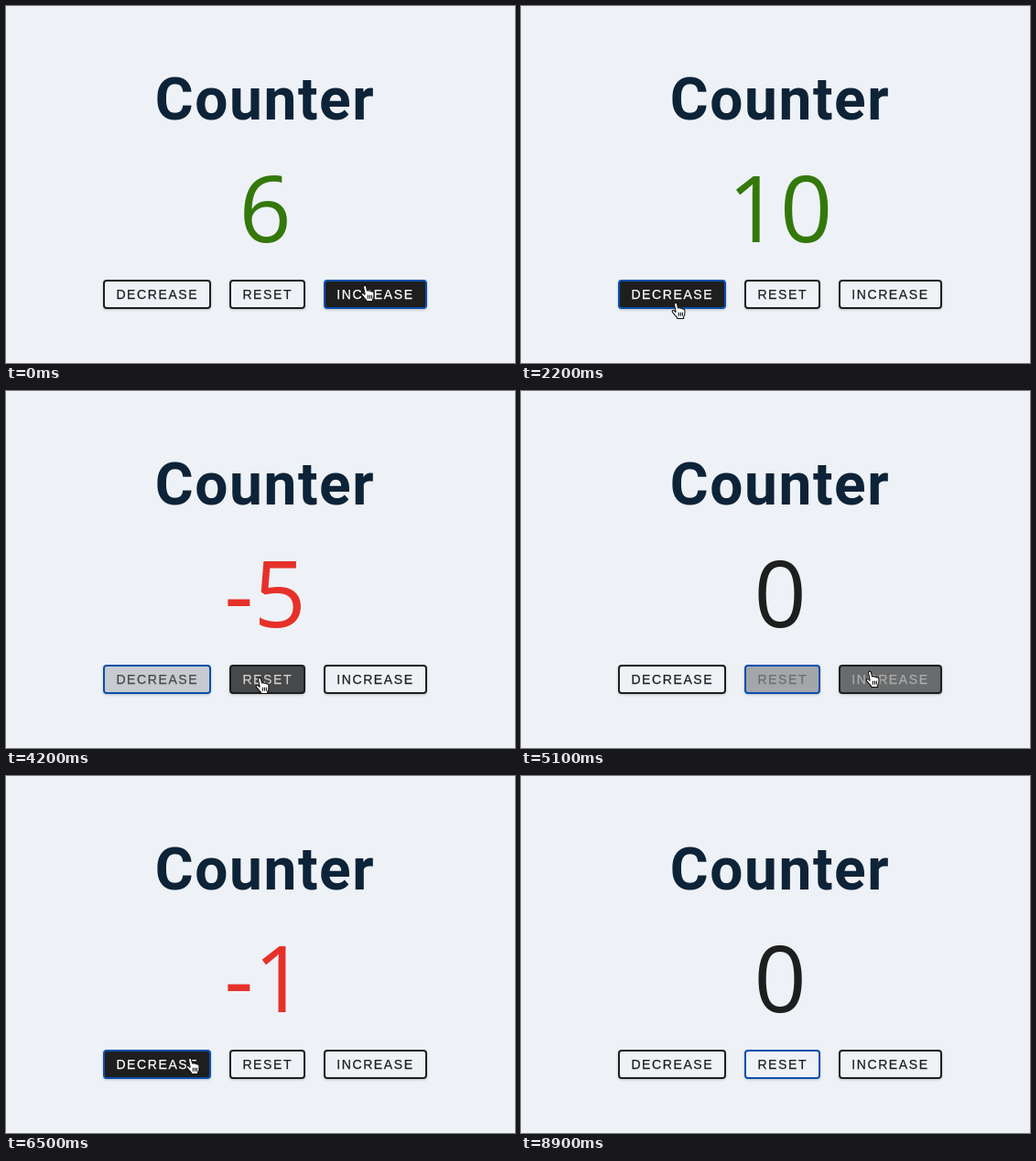
Write an HTML page that moves like this. It is 556 px wide and 390 px high and loops after 9000 ms.

```html
<!DOCTYPE html>
<html lang="en">
<head>
<meta charset="utf-8">
<title>Counter</title>
<style>
  html, body { margin: 0; width: 100%; height: 100%; overflow: hidden; background: #eef2f7; }
  svg { position: absolute; left: 0; top: 0; width: 556px; height: 390px; }
  text { text-anchor: middle; }
  .title { font: 700 64px Roboto, sans-serif; letter-spacing: 1.6px; fill: #0d2338; }
  .value { font: 500 100px "Open Sans", sans-serif; }
  .buttons { position: absolute; left: 106.4px; top: 299px; display: flex; gap: 20.16px; }
  button {
    margin: 0; padding: 6px 12px; height: 32px; box-sizing: border-box;
    font: 14px/16px "Liberation Sans", Arial, sans-serif; letter-spacing: 1.6px;
    -webkit-text-stroke: .25px currentColor;
    white-space: nowrap; border: 2px solid #1e1e1e; border-radius: 4px; outline: none;
    box-shadow: 0 1px 3px rgba(0, 0, 0, .2);
  }
  button.focused { border-color: #0a4fae; }
</style>
</head>
<body>
<svg viewBox="0 0 556 390">
  <text class="title" x="283" y="123.5">Counter</text>
  <text class="value" x="283" y="257.5"></text>
</svg>
<div class="buttons">
  <button>DECREASE</button>
  <button>RESET</button>
  <button>INCREASE</button>
</div>
<svg viewBox="0 0 556 390">
  <g id="cursor" stroke="#111" stroke-width="1.1" stroke-linejoin="round" stroke-linecap="round">
    <path fill="#fff" d="M-3 0L-4.5-7a1.5 1.5 0 0 1 2.9-.7L-.4-3q1.8-.8 2.5.3q1.7-.6 2.4.6q2-.4 2.4 1.3V3q0 2-1.3 3.5v2H-1q-.5-1.6-2.4-3.4L-6.6 1.3q-.6-1.5.8-1.8q1.2-.1 2.8 1.8z"/>
    <path fill="none" d="M.3 2v3.2M2.4 2v3.2M4.4 2v3.2"/>
  </g>
</svg>
<script>
const LOOP = 9000, FRAME = 100, FADE = 300, CLICK_PACE = 133, EXIT = 8350;
const DECREASE = 0, RESET = 1, INCREASE = 2;

// Each stop of the pointer: when it enters, where it rests, and its run of clicks.
const visits = [
  { button: INCREASE, enter: -FADE, x: 395, y: 314, firstClick: 68, clicks: 8 },
  { button: DECREASE, enter: 1430, x: 172, y: 333, firstClick: 1790, clicks: 7 },
  { button: RESET, enter: 2700, x: 280, y: 328, firstClick: 2900, clicks: 1 },
  { button: DECREASE, enter: 3035, x: 203, y: 325, firstClick: 3270, clicks: 5 },
  { button: RESET, enter: 3960, x: 280, y: 322, firstClick: 4400, clicks: 1 },
  { button: INCREASE, enter: 4911, x: 384, y: 315, firstClick: 5260, clicks: 3 },
  { button: DECREASE, enter: 5800, x: 204, y: 317, firstClick: 6024, clicks: 11 },
  { button: RESET, enter: 7779, x: 270, y: 318, firstClick: 8100, clicks: 1 }
];
visits.forEach((visit, i) => {
  const next = visits[i + 1];
  const travel = next && Math.abs(next.button - visit.button) > 1 ? 200 : 5;
  visit.leave = next ? next.enter - travel : EXIT;
});

const buttons = [...document.querySelectorAll('button')];
const valueText = document.querySelector('.value');
const cursor = document.getElementById('cursor');
const clamp = x => Math.max(0, Math.min(1, x));
const smooth = p => p * p * (3 - 2 * p);
const mix = (a, b, p) => a + (b - a) * p;

function counterAt(time) {
  let value = 6, focus = INCREASE;
  for (const { button, firstClick, clicks } of visits) {
    if (time < firstClick) break;
    const done = Math.min(clicks, 1 + Math.floor((time - firstClick) / CLICK_PACE));
    value = button === RESET ? 0 : value + done * (button - RESET);
    focus = button;
  }
  return { value, focus };
}

function hoverAt(button, time) {
  const levels = visits.filter(visit => visit.button === button).map(({ enter, leave }) =>
    clamp((Math.min(time, leave) - enter) / FADE) - Math.max(0, time - leave) / FADE);
  return clamp(Math.max(...levels));
}

function pointerAt(time) {
  let { x, y } = visits[0];
  for (let i = 1; i < visits.length; i++) {
    const start = visits[i - 1].leave - 80, end = visits[i].enter + 20;
    const p = smooth(clamp((time - start) / (end - start)));
    x = mix(x, visits[i].x, p);
    y = mix(y, visits[i].y, p);
  }
  return [x, y];
}

function draw(time) {
  const { value, focus } = counterAt(time);
  valueText.textContent = value;
  valueText.setAttribute('fill', value > 0 ? '#34780b' : value < 0 ? '#e6312a' : '#1e1e1e');

  buttons.forEach((button, i) => {
    const level = hoverAt(i, time), ink = mix(30, 255, level);
    button.style.background = `rgba(30, 30, 30, ${level})`;
    button.style.color = `rgb(${ink}, ${ink}, ${ink})`;
    button.classList.toggle('focused', i === focus);
  });

  const [x, y] = pointerAt(time);
  cursor.setAttribute('transform', `translate(${x} ${y})`);
  cursor.style.display = time < EXIT ? '' : 'none';
}

function tick() {
  const time = performance.now() % LOOP;
  draw(Math.floor(time / FRAME) * FRAME);
  requestAnimationFrame(tick);
}
tick();
</script>
</body>
</html>
```
